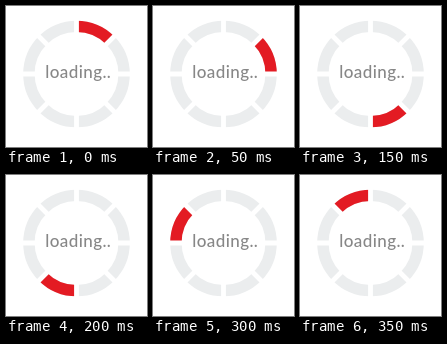
An HTML page for the animation above (0.4 s loop, 141x141 px).

```html
<!DOCTYPE html>
<html lang="en">
<head>
<meta charset="utf-8">
<title>Loading</title>
<style>
  html, body { margin: 0; width: 100%; height: 100%; overflow: hidden; background: #fff; }
  svg { display: block; width: 100%; height: 100%; }
  circle { fill: none; stroke-width: 11.4; }
  text { font: 500 17px Lato, sans-serif; letter-spacing: .4px; fill: #878787; }
</style>
</head>
<body>
<svg viewBox="0 0 141 141">
  <g transform="translate(70.5 68)">
    <circle r="47.6" stroke="#ebedee"/>
    <circle id="active" r="47.6" stroke="#e31b23" pathLength="8" stroke-dasharray="1 7"/>
    <!-- Parallel-sided gaps between the eight segments -->
    <path d="M0-55V-40M0 40V55M-55 0H-40M40 0H55
             M-39-39L-28-28M28 28L39 39M-39 39L-28 28M28-28L39-39"
          stroke="#fff" stroke-width="4.8"/>
  </g>
  <text x="39.3" y="71.5">loading..</text>
</svg>
<script>
  const SEGMENTS = 8, STEP_MS = 50;
  const active = document.getElementById("active");
  const start = performance.now();

  function draw(now) {
    const step = Math.floor(Math.max(0, now - start) / STEP_MS) % SEGMENTS;
    active.setAttribute("transform", `rotate(${step * 360 / SEGMENTS - 90})`);
    requestAnimationFrame(draw);
  }
  draw(start);
</script>
</body>
</html>
```
